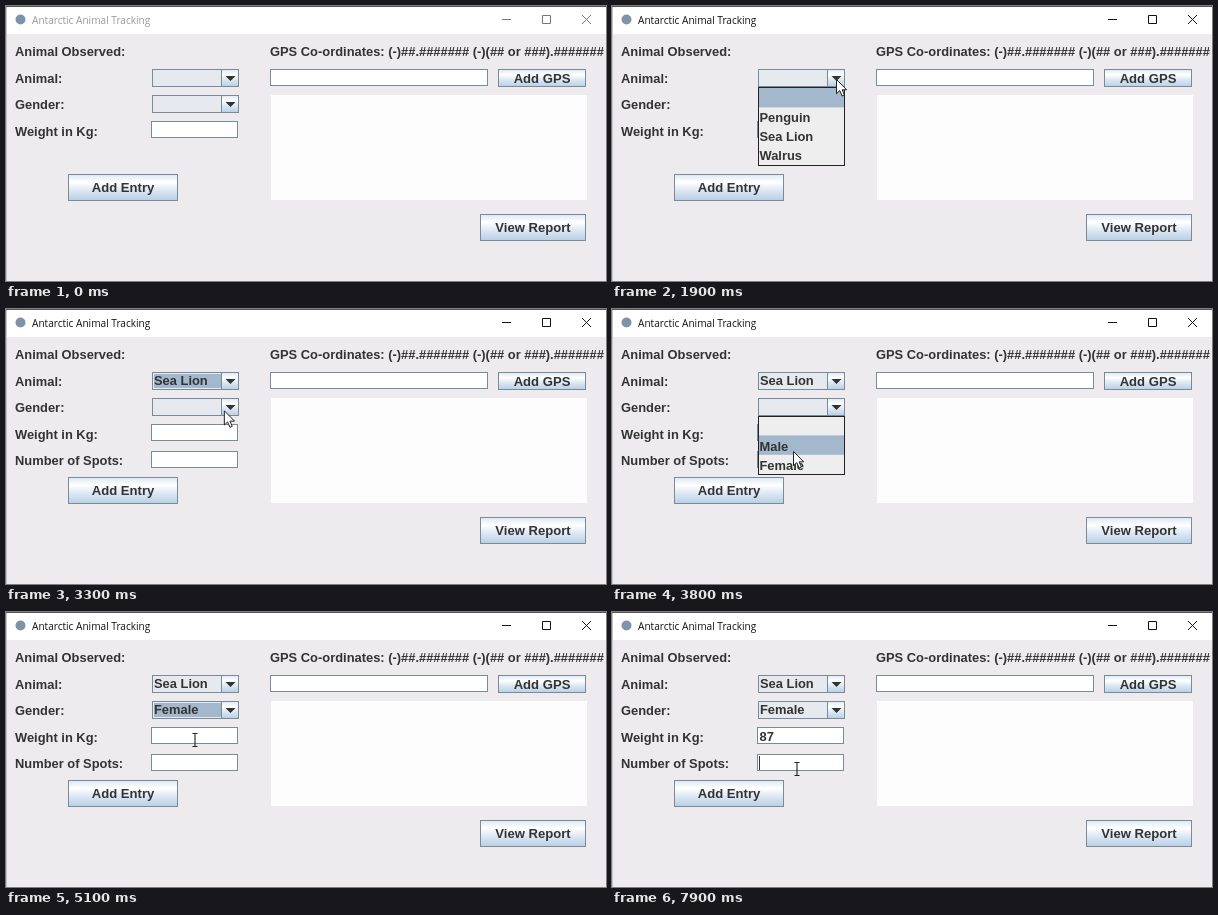
An HTML page that plays this animation: 600 by 275 pixels, repeating every 8000 ms.

```html
<!DOCTYPE html>
<html lang="en">
<head>
<meta charset="utf-8">
<title>Antarctic Animal Tracking</title>
<style>
  html, body { margin: 0; width: 100%; height: 100%; overflow: hidden; background: #edebed; }
  svg { display: block; width: 600px; height: 275px; cursor: default; }
  text { font: bold 12.9px "Liberation Sans", Arial, sans-serif; fill: #333; white-space: pre; }
  .title { font: 10.1px "Open Sans", "Noto Sans", sans-serif; fill: inherit; }
  .edge { stroke: #7a8a99; }
  .mid { text-anchor: middle; }
</style>
</head>
<body>
<svg id="stage" viewBox="0 0 600 275">
  <defs>
    <linearGradient id="ocean" x2="0" y2="1">
      <stop offset="0" stop-color="#dde8f3"/>
      <stop offset=".3" stop-color="#fff"/>
      <stop offset=".6" stop-color="#dde8f3"/>
      <stop offset="1" stop-color="#b8cfe5"/>
    </linearGradient>
  </defs>
</svg>
<script>
const LOOP = 8000, STEP = 100;
const stage = document.getElementById('stage');

// Moments at which the form changes state
const AT = {
  openAnimal: 1900, pickAnimal: 2900,
  openGender: 3500, pickGender: 4500,
  weight: 5700, typed: [6200, 6500], spots: 7500
};

// Pointer path: time, x, y
const PATH = [
  [0, 300, 300], [500, 300, 290], [900, 250, 150], [1200, 227, 101],
  [1600, 224, 73], [2000, 224, 73], [2700, 182, 128], [2900, 182, 130],
  [3400, 222, 98], [3600, 222, 98], [3800, 181, 142], [4200, 184, 156],
  [4500, 184, 157], [5100, 189, 128], [5700, 189, 128], [6000, 191, 127],
  [6900, 191, 127], [7400, 196, 143], [7600, 196, 143], [7900, 185, 157]
];

function add(parent, tag, attrs = {}, text = '') {
  const el = document.createElementNS('http://www.w3.org/2000/svg', tag);
  for (const key in attrs) el.setAttribute(key, attrs[key]);
  el.textContent = text;
  return parent.appendChild(el);
}
const group = (parent = stage) => add(parent, 'g');
const label = (x, y, text, parent = stage) => add(parent, 'text', { x, y }, text);
const box = (x, y, w, h, fill, parent = stage, cls = 'edge') =>
  add(parent, 'rect', { x: x + .5, y: y + .5, width: w - 1, height: h - 1, fill, class: cls });
const fill = (x, y, width, height, color, parent = stage) =>
  add(parent, 'rect', { x, y, width, height, fill: color });
const show = (el, on) => el.setAttribute('visibility', on ? 'visible' : 'hidden');

function button(x, y, w, h, text) {
  box(x, y, w, h, 'url(#ocean)');
  add(stage, 'text', { x: x + w / 2, y: y + h / 2 + 4.8, class: 'mid', style: 'font-size:13.1px' }, text);
}

function combo(y) {
  box(146, y, 87, 18, '#e6e9ed');
  const focus = fill(148, y + 2, 67, 14, '#a3b8cc');
  box(215, y, 18, 18, 'url(#ocean)');
  add(stage, 'path', { d: `M219.5 ${y + 7}h10l-5 5z`, fill: '#333' });
  return { focus, value: label(148, y + 13.3, '') };
}

function popup(y, items) {
  const g = group(), row = 19.4;
  const h = Math.round(items.length * row) + 1;
  box(146, y, 87, h, '#eee', g, '').setAttribute('stroke', '#222');
  const bar = fill(147, y + 1, 85, row, '#a3b8cc', g);
  items.forEach((text, i) => label(147.5, y + i * row + 15.2, text, g));
  return {
    draw(open, py) {
      show(g, open);
      const i = Math.max(0, Math.min(items.length - 1, Math.floor((py - y - 1) / row)));
      bar.setAttribute('y', y + (i ? i * row : 1));
    }
  };
}

// Window frame
fill(0, 0, 600, 275, '#edebed');
fill(0, 0, 600, 28, '#fff');
fill(0, 0, 600, 1, '#555');
fill(0, 1, 1, 274, '#c4c4c4');
add(stage, 'circle', { cx: 14.5, cy: 13.5, r: 5, fill: '#7c93a8' });
const bar = group();
add(bar, 'text', { x: 26, y: 17.5, class: 'title' }, 'Antarctic Animal Tracking');
const controls = add(bar, 'path', {
  d: 'M496 13.5h9M536.5 9.5h8v8h-8zM576 9l9 9M585 9l-9 9', fill: 'none'
});

// Form
label(9, 50, 'Animal Observed:');
label(9, 76.5, 'Animal:');
label(9, 103, 'Gender:');
label(9, 129.5, 'Weight in Kg:');
label(264, 50, 'GPS Co-ordinates: (-)##.####### (-)(## or ###).#######');
box(264, 63, 218, 17, '#fff');
fill(265, 89, 316, 105, '#fdfdfd');
box(145, 115, 87, 17, '#fff');
const weight = label(147.5, 129, '');
const extra = group();
label(9, 155.5, 'Number of Spots:', extra);
box(145, 142, 87, 17, '#fff', extra);
button(492, 63, 88, 18, 'Add GPS');
button(62, 168, 110, 27, 'Add Entry');
button(474, 208, 106, 27, 'View Report');
const animal = combo(63), gender = combo(89);
const caret = fill(147, 117, 1, 14, '#333');
const animals = popup(81, ['', 'Penguin', 'Sea Lion', 'Walrus']);
const genders = popup(107, ['', 'Male', 'Female']);

// Pointer shapes, drawn around their hot spots
const arrow = add(stage, 'path', {
  d: 'M.5 .5v14.2l3.3-3.1 2.3 5.4 2.3-1-2.3-5.2h4.6z', fill: '#fff', stroke: '#222'
});
const beam = add(stage, 'path', {
  d: 'M-2.5 -6.5h2l.5 .5 .5-.5h2M0 -6v12M-2.5 6.5h2l.5-.5 .5 .5h2', fill: 'none', stroke: '#222', 'stroke-width': 1.1
});

function pointer(t) {
  const n = PATH.findIndex(p => p[0] > t);
  if (n < 0) return PATH[PATH.length - 1].slice(1);
  const [a, ax, ay] = PATH[n - 1], [b, bx, by] = PATH[n];
  const k = (t - a) / (b - a), e = k * k * (3 - 2 * k);
  return [ax + (bx - ax) * e, ay + (by - ay) * e];
}

function draw(t) {
  const during = (a, b) => t >= a && t < b;
  const [x, y] = pointer(t);
  const active = t >= AT.openAnimal;
  bar.setAttribute('fill', active ? '#111' : '#999');
  controls.setAttribute('stroke', active ? '#111' : '#777');

  const picked = t >= AT.pickAnimal;
  animal.value.textContent = picked ? 'Sea Lion' : '';
  gender.value.textContent = t >= AT.pickGender ? 'Female' : '';
  show(animal.focus, during(AT.pickAnimal, AT.openGender));
  show(gender.focus, during(AT.pickGender, AT.weight));
  show(extra, picked);

  const animalOpen = during(AT.openAnimal, AT.pickAnimal);
  const genderOpen = during(AT.openGender, AT.pickGender);
  animals.draw(animalOpen, y);
  genders.draw(genderOpen, y);

  const typed = AT.typed.filter(k => t >= k);
  weight.textContent = '87'.slice(0, typed.length);
  const inSpots = t >= AT.spots;
  const since = inSpots ? AT.spots : Math.max(AT.weight, ...typed);
  caret.setAttribute('x', inSpots ? 147 : 147 + typed.length * 7.2);
  caret.setAttribute('y', inSpots ? 144 : 117);
  show(caret, t >= AT.weight && (t - since) % 1000 < 500);

  const onField = x > 145 && x < 232 && (y > 115 && y < 132 || picked && y > 142 && y < 159);
  const editing = onField && !animalOpen && !genderOpen;
  show(arrow, !editing);
  show(beam, editing);
  (editing ? beam : arrow).setAttribute('transform', `translate(${x} ${y})`);
}

const start = performance.now();
function tick(now) {
  const t = Math.max(0, now - start) % LOOP;
  draw(Math.floor(t / STEP) * STEP);
  requestAnimationFrame(tick);
}
draw(0);
requestAnimationFrame(tick);
</script>
</body>
</html>
```
